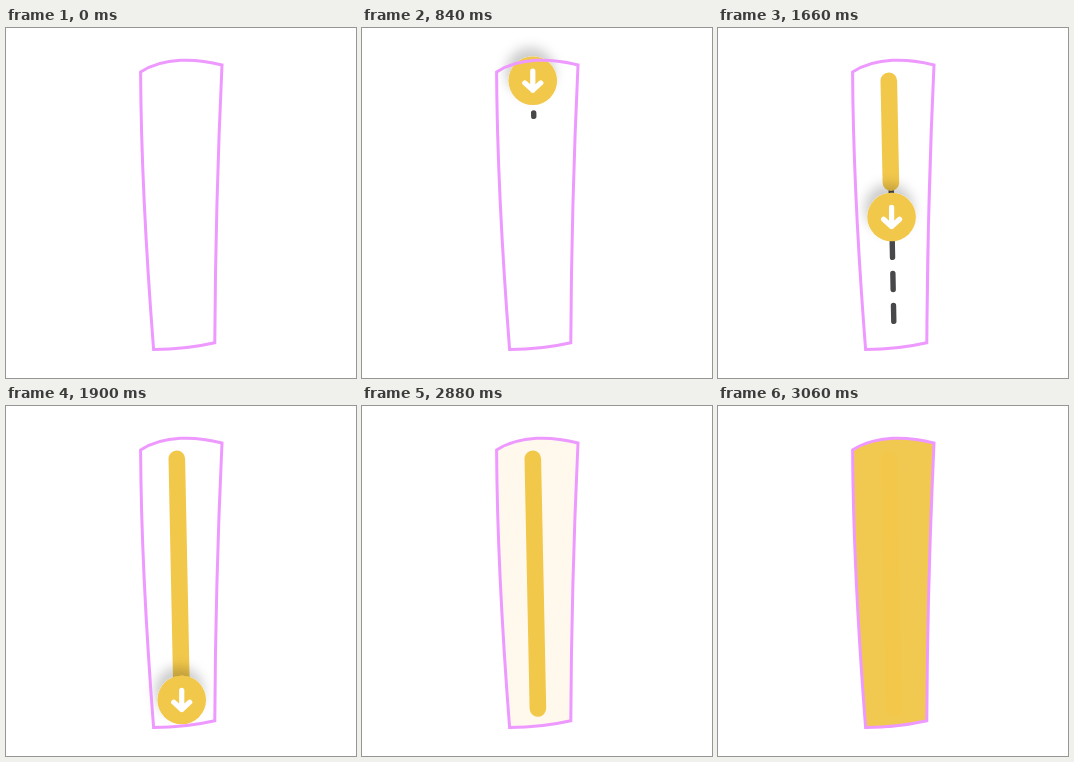
An HTML page for the animation above (4800 ms loop, 350x350 px).

```html
<!DOCTYPE html>
<html lang="en">
<head>
<meta charset="utf-8">
<title>Tracing a stroke</title>
<style>
  html, body { margin: 0; width: 100%; height: 100%; overflow: hidden; background: #fff; }
  svg { display: block; width: 100%; height: 100%; }
</style>
</head>
<body>
<svg viewBox="0 0 350 350" fill="none" stroke-linecap="round" stroke-linejoin="round">
  <defs>
    <filter id="shadow" x="-50%" y="-60%" width="200%" height="200%">
      <feDropShadow dx="-2.5" dy="-9" stdDeviation="6" flood-color="#000" flood-opacity=".2"/>
    </filter>
    <path id="shape" d="M134.6 44C158 29 190 30.3 216 37Q209.5 176 208.8 314.8Q180 321.4 147.6 321.6Q135.2 162 134.6 44Z"/>
  </defs>
  <path id="dashes" stroke="#48484a" stroke-width="5.4" stroke-dasharray="16 16.1"/>
  <path id="trail" stroke="#f2c84b" stroke-width="16.6"/>
  <use id="fill" href="#shape" fill="#f2c84b"/>
  <g id="ball">
    <circle r="24.3" fill="#f2c84b" filter="url(#shadow)"/>
    <path d="M0 -9.6V9.5M-8 2.2L0 9.5L8 2.2" stroke="#fff" stroke-width="5.2"/>
  </g>
  <use href="#shape" stroke="#ee99ff" stroke-width="3" stroke-linejoin="miter"/>
</svg>
<script>
const LOOP = 4800;
const [dashes, trail, fill, ball] =
  ['dashes', 'trail', 'fill', 'ball'].map(id => document.getElementById(id));

const ramp = (t, start, length) => Math.min(1, Math.max(0, (t - start) / length));
const ease = p => (1 - Math.cos(Math.PI * p)) / 2;
const along = ([x1, y1, x2, y2], p) => [x1 + (x2 - x1) * p, y1 + (y2 - y1) * p];

const guide = [171.7, 85, 175.8, 293.4];
const track = [170.8, 52.7, 175.9, 302.4];

function drawLine(el, line, p) {
  el.setAttribute('d', `M${line[0]} ${line[1]}L${along(line, p)}`);
  el.setAttribute('visibility', p > 0 ? 'visible' : 'hidden');
}

function render(t) {
  drawLine(dashes, guide, ramp(t, 832, 490));
  drawLine(trail, track, ease(ramp(t, 1360, 680)));
  ball.setAttribute('transform', `translate(${along(track, ease(ramp(t, 1300, 680)))})`);
  ball.setAttribute('opacity', t < 60 ? 0 : ramp(t, 40, 160) * (1 - ramp(t, 2420, 140)));
  fill.setAttribute('opacity', t < 2880 ? 0 : 0.97 * ramp(t, 2858, 202));
}

let start;
function tick(now) {
  start ??= now;
  render((now - start) % LOOP);
  requestAnimationFrame(tick);
}
render(0);
requestAnimationFrame(tick);
</script>
</body>
</html>
```
